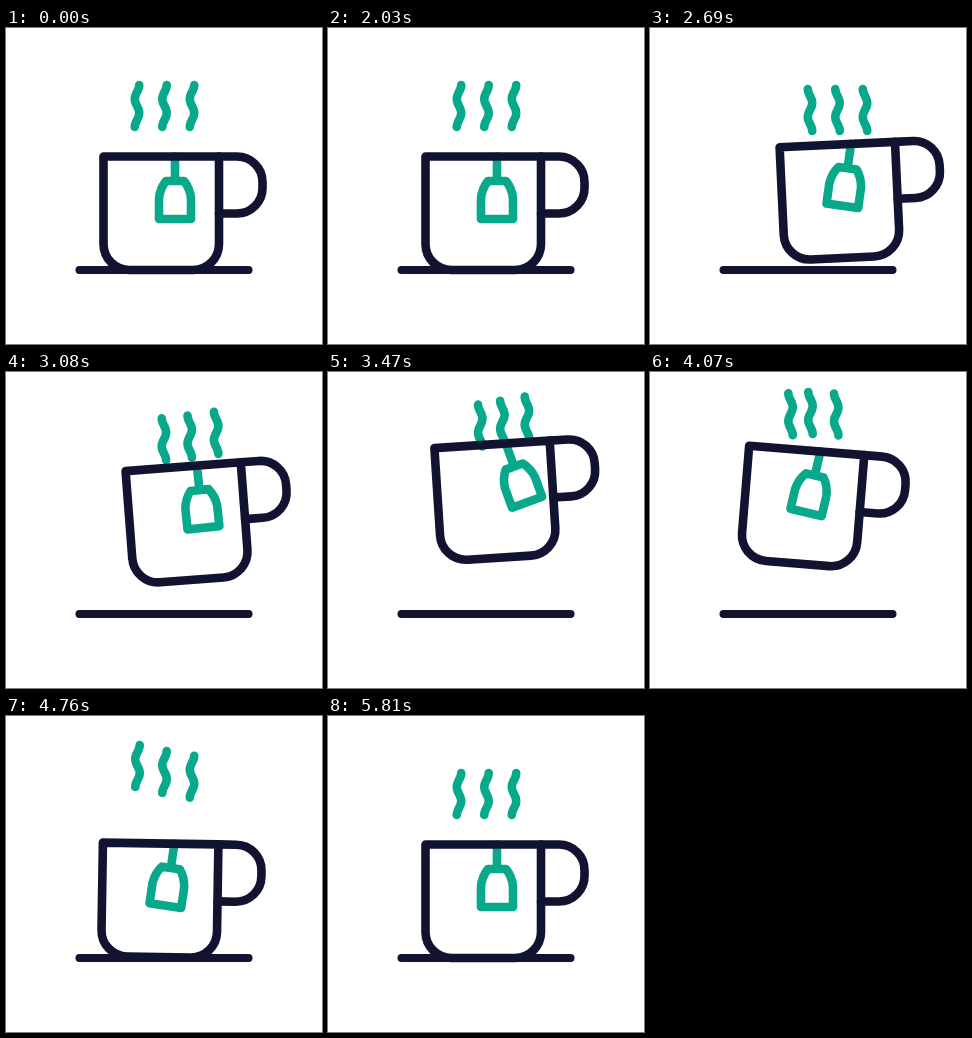
An HTML page that plays this animation: 316 by 316 pixels, repeating every 5870 ms.

```html
<!DOCTYPE html>
<html lang="en">
<head>
<meta charset="utf-8">
<title>Tea cup</title>
<style>
  html, body { margin: 0; width: 100%; height: 100%; overflow: hidden; background: #fff; }
  svg { display: block; width: 100%; height: 100%; }
  path { fill: none; stroke-width: 8.6; stroke-linecap: round; stroke-linejoin: round; }
  .ink { stroke: #121331; }
  .tea { stroke: #08a88a; }
  .saucer { stroke-width: 8; }
</style>
</head>
<body>
<svg viewBox="0 0 316 316">
  <path class="ink saucer" d="M73.5 242H242.5"/>
  <g id="steam"></g>
  <g id="bag">
    <path class="tea" d="M0 0V23"/>
    <path class="tea" d="M-9 24.500H9Q15 32 16 42V62.500H-16V42Q-15 32 -9 24.500Z"/>
  </g>
  <g id="cup">
    <path class="ink" d="M-57.500 -56.500H58V31A26 26 0 0 1 32 57H-31.500A26 26 0 0 1 -57.500 31Z"/>
    <path class="ink" d="M58 -56.500H76A25.500 25.500 0 0 1 101.500 -31V-25A25.500 25.500 0 0 1 76 .5H58"/>
  </g>
</svg>
<script>
const LOOP = 5870;
const START = 2030;   // lift-off
const PULL = 2690;    // furthest right
const REST = 5600;    // steam settled
const $ = id => document.getElementById(id);

// Sine easing from 0 at START through [time, value, skew] points
function glide(...points) {
  return t => {
    let from = START, value = 0;
    for (const [to, next, skew = 1] of points) {
      if (t < to) {
        const u = Math.max(0, (t - from) / (to - from)) ** skew;
        return value + (next - value) * (1 - Math.cos(Math.PI * u)) / 2;
      }
      from = to;
      value = next;
    }
    return value;
  };
}

const cup = {
  x: glide([PULL, 34.7], [4350, -5, 0.82], [5000, 0]),
  y: glide([3750, -62.5, 1.3], [4850, 0]),
  tilt: glide([3200, -4.5], [4200, 5.3, 1.3], [4970, 0])
};
const swing = glide([PULL, 8], [3470, -20], [4200, 16], [5060, -9, 2.3], [5400, 4], [5810, 0]);
const flip = glide([PULL, 1], [4070, 1], [4700, 0]);

// The right wisp rises first, the others trail behind it
const wisps = [0, 1, 2].map(i => {
  const lag = 2 - i;
  const path = document.createElementNS('http://www.w3.org/2000/svg', 'path');
  path.setAttribute('class', 'tea');
  $('steam').append(path);
  return {
    path,
    home: 131 + 27.5 * i,
    x: glide([PULL, 29], [4150 + 200 * lag * lag, 0]),
    y: glide([PULL, 4], [3850 + 250 * lag, -37, 0.62], [REST, 0])
  };
});

// One and a half cosine waves, 42 units tall
function wave(size) {
  const points = [];
  for (let y = -21; y <= 21; y += 1.5) {
    points.push(`${size * Math.cos(Math.PI * (y + 21) / 14)} ${y}`);
  }
  return 'M' + points.join('L');
}

const place = (el, x, y, angle = 0) =>
  el.setAttribute('transform', `translate(${x} ${y}) rotate(${angle})`);

function draw(t) {
  const x = 155 + cup.x(t), y = 185 + cup.y(t), tilt = cup.tilt(t);
  place($('cup'), x, y, tilt);

  // The bag hangs from the rim and swings on its own
  const r = tilt * Math.PI / 180, cos = Math.cos(r), sin = Math.sin(r);
  const px = 14, py = -56.5;
  place($('bag'), x + px * cos - py * sin, y + px * sin + py * cos, swing(t));

  const d = wave(2.2 * (1 - 2 * flip(t)));
  for (const w of wisps) {
    w.path.setAttribute('d', d);
    place(w.path, w.home + w.x(t), 78 + w.y(t));
  }
}

const start = performance.now();
function tick() {
  draw((performance.now() - start) % LOOP);
  requestAnimationFrame(tick);
}
tick();
</script>
</body>
</html>
```
